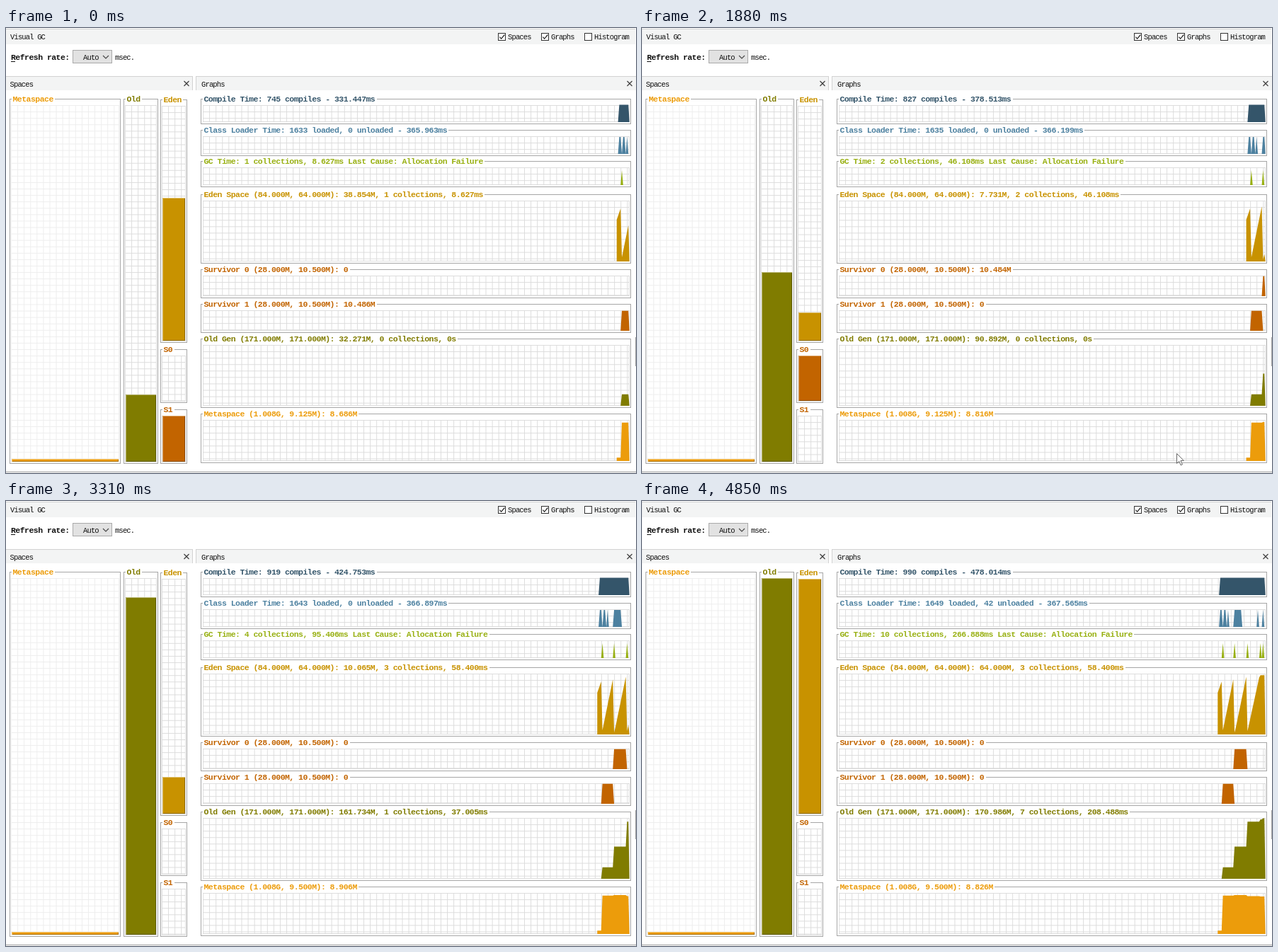
An HTML page for the animation above (4.9 s loop, 890 px wide and 629 px high).

```html
<!DOCTYPE html>
<html lang="en">
<head>
<meta charset="utf-8">
<title>Visual GC</title>
<style>
html, body { margin: 0; width: 100%; height: 100%; overflow: hidden; background: #fff; }
svg { display: block; }
text { font: 10.5px "Liberation Mono", monospace; letter-spacing: -.85px; fill: #111; white-space: pre; }
.b { font-weight: bold; font-size: 11.5px; letter-spacing: -.54px; }
.crisp { shape-rendering: crispEdges; }
</style>
</head>
<body>
<svg id="stage" width="890" height="629" viewBox="0 0 890 629"></svg>
<script>
const LOOP = 4900, STEP = 1.83, HEAD = 879.2, CHAR = 6.36, GAP = 9.08;
const stage = document.getElementById('stage');
const C = { compile: '#34556a', loader: '#4d81a0', gc: '#98b012', eden: '#c89200',
  surv: '#c26400', old: '#807c00', meta: '#ec9c0b' };

function el(tag, attrs, text) {
  const e = document.createElementNS('http://www.w3.org/2000/svg', tag);
  for (const k in attrs) e.setAttribute(k, attrs[k]);
  if (text) e.textContent = text;
  return stage.appendChild(e);
}
const rect = (x, y, width, height, fill, more) => el('rect', { x, y, width, height, fill, class: 'crisp', ...more });
const line = (d, stroke, width = 1, more) => el('path', { d, stroke, fill: 'none', 'stroke-width': width, ...more });
const rule = d => line(d, '#d2d2d2', 1, { class: 'crisp' });
const label = (x, y, s, cls = '') => el('text', { x, y, class: cls }, s);

function grid(x0, y0, x1, y1, color) {
  let d = `M${x1 - .5} ${y0}V${y1}M${x0} ${y1 - .5}H${x1}`;
  for (let x = x0 + .5; x < x1; x += GAP) d += `M${x} ${y0}V${y1}`;
  for (let y = y0 + .5; y < y1; y += GAP) d += `M${x0} ${y}H${x1}`;
  line(d, color, .95);
}

// Framed box whose caption interrupts the top border
function box(x, y, x1, y1, color, caption) {
  rect(x + .5, y + .5, x1 - x - 1, y1 - y - 1, 'none', { stroke: '#a6a6a6' });
  const gap = rect(x + 3, y - 4, 0, 9, '#fff');
  const text = el('text', { x: x + 4.5, y: y + 4, class: 'b', style: 'fill:' + color });
  const set = s => {
    text.textContent = s;
    gap.setAttribute('width', s.length * CHAR + 4);
  };
  if (caption) set(caption);
  return set;
}

function header(x, y, w, h, title, tx) {
  rect(x, y, w, h, '#f3f4f4');
  rule(`M${x} ${y + .5}h${w}`);
  label(tx, y + 15, title);
}
const cross = x => line(`M${x} 75l7 7m0 -7l-7 7`, '#444', 1.3);

function check(x, name, on) {
  rect(x + .5, 7.5, 10, 10, '#fff', { stroke: '#333' });
  if (on) line(`M${x + 2.3} 12.6l2.4 2.5l4.6 -5.6`, '#222', 1.2);
  label(x + 14, 16, name);
}

header(0, 1, 889, 22, 'Visual GC', 6);
check(695, 'Spaces', true);
check(756, 'Graphs', true);
check(817, 'Histogram', false);
label(7, 45, 'Refresh rate:', 'b');
line('M7 47.5h6', '#111');
rect(94.5, 31.5, 55, 18, '#e2e2e2', { stroke: '#a9a9a9' });
label(109, 45, 'Auto');
line('M137 39l4 4l4 -4', '#444', 1.1);
label(154, 45, 'msec.');
header(0, 68, 263, 20, 'Spaces', 5.5);
header(269, 68, 621, 20, 'Graphs', 276);
rule('M263.5 68v20M268.5 68v20');
cross(251.5);
cross(877.5);
line('M0 627.5H890M889.5 437V478', '#a0a0a0');

const hold = (keys, i) => keys.filter(k => k[0] <= i).pop();
function ramp(keys, i, col) {
  const a = hold(keys, i), b = keys[keys.indexOf(a) + 1];
  return b ? a[col] + (b[col] - a[col]) * (i - a[0]) / (b[0] - a[0]) : a[col];
}

// sample, compiles, compile ms, classes, loading ms
const work = [
  [9, 745, 331.447, 1633, 365.963],
  [13, 818, 371.865, 1634, 366.117],
  [14, 827, 378.513, 1635, 366.199],
  [20, 897, 416.742, 1643, 366.897],
  [24, 919, 424.753, 1643, 366.897],
  [29, 956, 458.680, 1643, 366.897],
  [35, 990, 478.014, 1649, 367.565]];
// sample, young collections and ms, full collections and ms, old space, metaspace
const cycles = [
  [0, 0, 0, 0, 0, 0, .75],
  [4, 1, 8.627, 0, 0, 32.271, 8.686],
  [13, 2, 46.108, 0, 0, 90.892, 8.816],
  [23, 3, 58.4004, 1, 37.0054, 161.734, 8.906],
  [33, 3, 58.4004, 4, 118.704, 168.152, 8.826],
  [35, 3, 58.4004, 7, 208.488, 170.986, 8.826]];
// sample, eden size, growth per sample
const fills = [[0, 45, 4], [4, 4.6, 6.8508], [13, 2.042, 5.689], [14, 7.731, 6.8055], [23, 3.6386, 6.4264]];
const bursts = [[2, 3], [5, 6], [8, 8], [13, 18], [31, 31], [35, 35]];

const state = n => {
  const [, young, youngMs, full, fullMs, old, meta] = hold(cycles, n);
  const [at, size, rate] = hold(fills, n);
  return { young, youngMs, full, fullMs, old, meta,
    eden: Math.min(64, size + rate * (n - at)),
    cap: n < 23 ? 9.125 : 9.5,
    s0: n >= 13 && n < 23 ? 10.484 : 0,
    s1: n >= 4 && n < 13 ? 10.486 : 0,
    loading: bursts.some(([a, b]) => n >= a && n <= b),
    paused: n > 0 && cycles.some(c => c[0] === n) };
};
const ms = v => v.toFixed(3) + 'ms';
const mb = v => v ? v.toFixed(3) + 'M' : '0';
const count = (n, col) => Math.round(ramp(work, n, col));

// top, bottom, colour, height of a sample, caption
const graphs = [
  [100, 136, C.compile, (s, i) => i < 2 ? 0 : 24.5,
    (s, n) => `Compile Time: ${count(n, 1)} compiles - ${ms(ramp(work, n, 2))}`],
  [144, 181, C.loader, s => s.loading ? 24 : 0,
    (s, n) => `Class Loader Time: ${count(n, 3)} loaded, ${n < 33 ? 0 : 42} unloaded - ${ms(ramp(work, n, 4))}`],
  [188, 225, C.gc, s => s.paused ? 21 : 0,
    s => `GC Time: ${s.young + s.full} collections, ${ms(s.youngMs + s.fullMs)} Last Cause: Allocation Failure`],
  [235, 333, C.eden, s => s.eden * 1.31,
    s => `Eden Space (84.000M, 64.000M): ${mb(s.eden)}, ${s.young} collections, ${ms(s.youngMs)}`],
  [341, 382, C.surv, s => s.s0 * 2.7, s => `Survivor 0 (28.000M, 10.500M): ${mb(s.s0)}`],
  [390, 431, C.surv, s => s.s1 * 2.7, s => `Survivor 1 (28.000M, 10.500M): ${mb(s.s1)}`],
  [439, 537, C.old, s => s.old * .5,
    s => `Old Gen (171.000M, 171.000M): ${mb(s.old)}, ${s.full} collections, ${s.full ? ms(s.fullMs) : '0s'}`],
  [545, 615, C.meta, s => s.meta / s.cap * 57,
    s => `Metaspace (1.008G, ${mb(s.cap)}): ${mb(s.meta)}`]
].map(([y, y1, color, height, caption]) => {
  const base = y1 - 3;
  grid(278, y + 9, 881, base, '#dcdcdc');
  const set = box(275, y, 883, y1, color);
  const area = el('path', { fill: color });
  return (s, n) => {
    const x = i => HEAD - (n - i) * STEP;
    let d = `M${x(0)} ${base}`;
    for (let i = 0; i <= n; i++) d += `L${x(i)} ${base - height(state(i), i)}`;
    area.setAttribute('d', d + `L880.7 ${base}Z`);
    set(caption(s, n));
  };
});

// left, top, right, bottom, colour, grid, caption, filled share
const bars = [
  [5, 100, 162, 616, C.meta, '#eeeeee', 'Metaspace', () => .008],
  [166, 100, 215, 616, C.old, '#dcdcdc', 'Old', s => s.old / 171],
  [218, 101, 256, 445, C.eden, '#dcdcdc', 'Eden', s => s.eden / 64],
  [218, 454, 256, 530, C.surv, '#dcdcdc', 'S0', s => s.s0 / 10.5],
  [218, 539, 256, 616, C.surv, '#dcdcdc', 'S1', s => s.s1 / 10.5]
].map(([x, y, x1, y1, color, tint, caption, share]) => {
  const left = x + 3, right = x1 - 3, top = y + 9, base = y1 - 3;
  grid(left - 1, top, right + 1, base + 1, tint);
  box(x, y, x1, y1, color, caption);
  const body = el('path', { fill: color });
  const lit = line('', '#fff', 1, { opacity: .45 }), shade = line('', '#000', 1, { opacity: .25 });
  return s => {
    const h = Math.round((base - top) * share(s)), t = base - h;
    body.setAttribute('d', h ? `M${left} ${t}H${right}V${base}H${left}Z` : '');
    lit.setAttribute('d', h ? `M${left + .5} ${base}V${t + .5}H${right}` : '');
    shade.setAttribute('d', h ? `M${left + 1} ${base - .5}H${right - .5}V${t + 1}` : '');
  };
});

const cursor = el('path', { d: 'M.5 .5V14.5L3.8 11.4L6.2 17L8.4 16L6 10.6H10.3Z', fill: '#fff', stroke: '#555', 'stroke-width': .9 });
const trail = [[180, 748, 592], [530, 728, 547], [730, 728, 547], [1080, 704, 595], [1280, 699, 574],
  [1580, 724, 541], [1780, 728, 580], [1880, 755, 601], [1980, 766, 618]];

const ticks = [80, 300, 600, 730, 1880, 2080];
for (let k = 0; k < 21; k++) ticks.push(2290 + 127.5 * k);

let shown = -1;
function draw(t) {
  const n = 9 + ticks.filter(s => s <= t).length;
  if (n !== shown) {
    const s = state(n);
    for (const update of [...graphs, ...bars]) update(s, n);
    shown = n;
  }
  // The pointer is only seen every 100 ms
  const seen = 80 + Math.floor((t - 80) / 100) * 100;
  const visible = seen >= 180 && seen < 2080;
  cursor.setAttribute('visibility', visible ? 'visible' : 'hidden');
  if (visible) cursor.setAttribute('transform', `translate(${ramp(trail, seen, 1)} ${ramp(trail, seen, 2)})`);
}
const start = performance.now();
function tick() {
  draw((performance.now() - start) % LOOP);
  requestAnimationFrame(tick);
}
tick();
</script>
</body>
</html>
```
